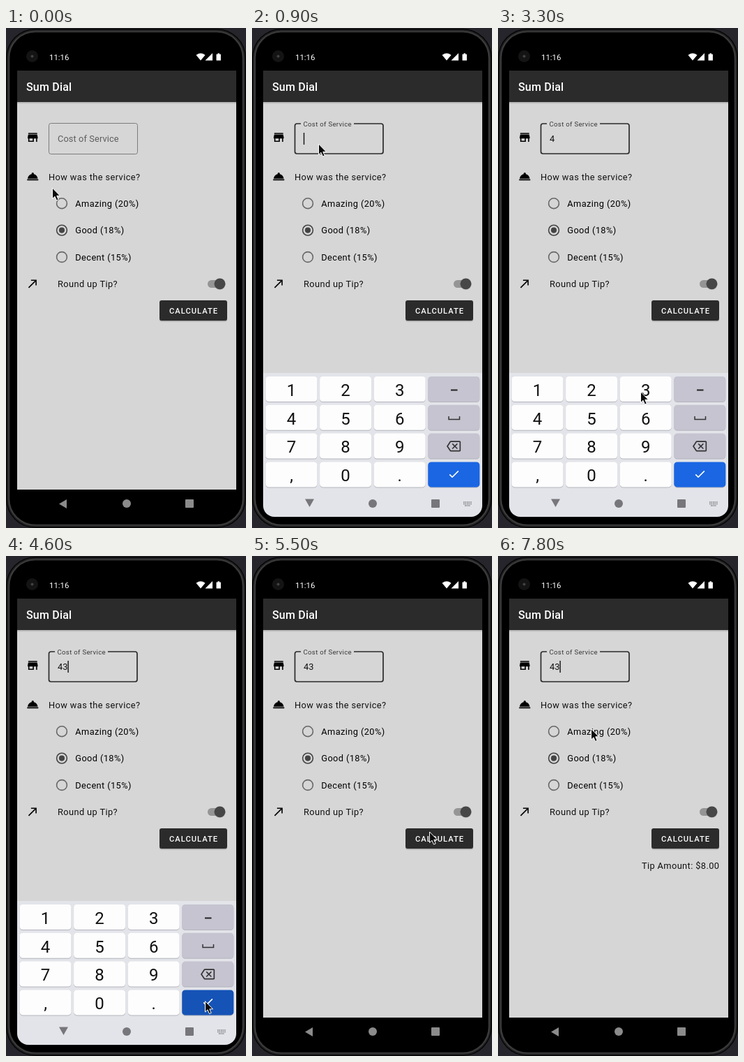
An HTML page that plays this animation: 344x716 px, repeating every 8 s.

```html
<!DOCTYPE html>
<html lang="en">
<head>
<meta charset="utf-8">
<title>Tip calculator</title>
<style>
  html, body { margin: 0; width: 100%; height: 100%; overflow: hidden; background: #25252b; }
  svg { display: block; width: 344px; height: 716px; }
  text { font-family: Roboto, sans-serif; font-size: 12.8px; letter-spacing: .4px; fill: #111; }
  .title { font-size: 16px; font-weight: 500; letter-spacing: .2px; fill: #fff; }
  .clock { font-size: 11.4px; letter-spacing: 0; fill: #fff; }
  .field { letter-spacing: .1px; }
  .button { font-size: 11.2px; font-weight: 500; letter-spacing: 1px; fill: #fff; }
  .digit { font-size: 24px; letter-spacing: 0; text-anchor: middle; fill: #111; }
</style>
</head>
<body>
<svg viewBox="0 0 344 716">
  <defs>
    <clipPath id="screen"><path d="M16 61H330V684a16 16 0 0 1-16 16H32a16 16 0 0 1-16-16Z"/></clipPath>
    <clipPath id="buttonClip"><rect x="220" y="390" width="97" height="29" rx="3"/></clipPath>
    <linearGradient id="shade" x2="0" y2="1"><stop stop-opacity=".2"/><stop offset="1" stop-opacity="0"/></linearGradient>
  </defs>

  <!-- phone -->
  <rect x="0" y="1" width="344" height="715" rx="42" fill="#040404"/>
  <rect x="3.500" y="4.500" width="337" height="708" rx="38.500" fill="#000" stroke="#242425" stroke-width="4"/>
  <rect x="4" y="5" width="336" height="707" rx="38" fill="none" stroke="#474748" stroke-width="1.200"/>
  <circle cx="37.500" cy="40.500" r="8.500" fill="#141415"/>
  <circle cx="37.500" cy="40.500" r="2" fill="#414145"/>
  <text class="clock" x="62" y="45.500">11:16</text>
  <g fill="#fff">
    <path d="M272.500 38.700Q279 33.800 285.500 38.700L279 46.500Z"/>
    <path d="M296 36V46.500H285.500Z"/>
    <path d="M301.500 37.500h2v-1.300h2.400v1.300h2v9h-6.400Z"/>
  </g>

  <!-- app -->
  <rect x="16" y="61" width="314" height="600" fill="#d6d6d6"/>
  <rect x="16" y="106" width="314" height="3" fill="url(#shade)"/>
  <rect x="16" y="61" width="314" height="45" fill="#2b2b2b"/>
  <text class="title" x="29" y="90">Sum Dial</text>
  <path transform="translate(28.700 147) scale(.8)" d="M20 4H4v2h16V4zm1 10v-2l-1-5H4l-1 5v2h1v6h10v-6h4v6h2v-6h1zm-9 4H6v-4h6v4z"/>
  <path transform="translate(28.700 203) scale(.8)" d="M2 17h20v2H2zm11.840-9.210c.1-.24.16-.51.16-.79 0-1.100-.9-2-2-2s-2 .9-2 2c0 .28.06.55.16.79C6.250 8.600 3.270 11.930 3 16h18c-.27-4.070-3.250-7.400-7.160-8.210z"/>
  <path transform="translate(28.700 356.500) scale(.8)" d="M9 5v2h6.590L4 18.590 5.410 20 17 8.410V15h2V5z"/>

  <path id="outline" fill="none"/>
  <text class="field" id="label">Cost of Service</text>
  <text class="field" id="value" x="74" y="163"></text>
  <rect id="caret" y="150" width="1.400" height="17" fill="#111"/>

  <text x="61" y="217.500">How was the service?</text>
  <g id="radios"></g>
  <text x="74" y="371">Round up Tip?</text>
  <rect x="289" y="361" width="22" height="11" rx="5.500" fill="#959595"/>
  <circle cx="306.500" cy="367" r="8.200" opacity=".12"/>
  <circle cx="306.500" cy="366.300" r="7.900" fill="#474747"/>
  <rect x="220" y="391.500" width="97" height="29" rx="3" opacity=".2"/>
  <rect x="220" y="390" width="97" height="29" rx="3" fill="#2b2b2b"/>
  <circle id="ripple" cx="255" cy="403" fill="#fff" clip-path="url(#buttonClip)"/>
  <text class="button" x="234" y="409">CALCULATE</text>
  <text id="result" x="317.400" y="447.700" text-anchor="end">Tip Amount: $8.00</text>

  <!-- navigation and keyboard -->
  <path id="backLeft" d="M76 681.500L87 675V688Z" fill="#8b8b8b"/>
  <g clip-path="url(#screen)">
    <g id="keyboard">
      <rect x="16" y="494" width="314" height="206" fill="#e3e4e9"/>
      <g id="keys"></g>
      <path d="M282 556v4.500h15.500v-4.500" fill="none" stroke="#333" stroke-width="1.500"/>
      <path d="M285 518.500h9.500" stroke="#222" stroke-width="1.800"/>
      <path transform="translate(279 588.800) scale(.84)" fill="#333" d="M22 3H7c-.69 0-1.230.35-1.590.88L0 12l5.410 8.110c.36.53.9.89 1.590.89h15c1.100 0 2-.9 2-2V5c0-1.100-.9-2-2-2zm0 16H7.070L2.400 12l4.660-7H22v14zm-11.590-2L14 13.410 17.590 17 19 15.590 15.410 12 19 8.410 17.590 7 14 10.590 10.410 7 9 8.410 12.590 12 9 15.590z"/>
      <path transform="translate(280 629.500) scale(.78)" fill="#fff" d="M9 16.170L4.830 12l-1.420 1.410L9 19 21 7l-1.410-1.410z"/>
      <path d="M76 674.500H89L82.500 686Z" fill="#77777b"/>
      <path d="M303 679h12M303 681.500h12M305 684h8" stroke="#7c7c80" stroke-width="1.500" stroke-dasharray="1.600 .9"/>
    </g>
  </g>
  <g id="home"><circle cx="173" cy="681" r="6"/><rect x="257" y="675" width="12" height="12" rx="1"/></g>

  <path id="pointer" d="M0 0V15.500L3.500 12.300 6 18 8.700 16.900 6.300 11.300H11Z" fill="#0a0a0a" stroke="#fff" stroke-width="1" stroke-linejoin="round"/>
</svg>
<script>
const $ = id => document.getElementById(id);
const set = (id, attrs) => { for (const k in attrs) $(id).setAttribute(k, attrs[k]); };
const show = (id, on) => set(id, { visibility: on ? 'visible' : 'hidden' });
const ramp = (t, a, b) => Math.min(1, Math.max(0, (t - a) / (b - a)));
const ease = p => p * p * (3 - 2 * p);
const within = (t, a, b) => t >= a && t < b;

const LOOP = 8000, STEP = 100;
const FOCUS = 600, FIRST = 2600, SECOND = 3600, HIDE = 4700, RESULT = 6200;

// pointer stops: time, x, y
const stops = [
  [0, 66.5, 229], [600, 95.5, 166], [1000, 95.5, 166],
  [2100, 68.5, 546], [2500, 68.5, 546], [3300, 204.5, 521], [3700, 204.5, 521],
  [4500, 285.5, 637.5], [4700, 285.5, 637.5],
  [5500, 254.5, 395], [5800, 254.5, 403], [6900, 254.5, 403],
  [7200, 250, 418.5], [7800, 133.5, 247.5], [LOOP, 133.5, 247.5]
];

const choices = ['Amazing (20%)', 'Good (18%)', 'Decent (15%)'];
$('radios').innerHTML = choices.map((name, i) => {
  const y = 251.2 + 38.4 * i, on = i === 1;
  return `<circle cx="80" cy="${y}" r="7.4" fill="none" stroke="${on ? '#444' : '#686868'}" stroke-width="1.6"/>` +
    (on ? `<circle cx="80" cy="${y}" r="4.1" fill="#444"/>` : '') +
    `<text x="99.300" y="${y + 4.6}" style="fill:#000">${name}</text>`;
}).join('');

$('keys').innerHTML = [...'123-456_789<,0.>'].map((key, i) => {
  const col = i % 4, x = 19.5 + 77.6 * col, y = 499 + 40.8 * (i >> 2);
  const fill = key === '>' ? '#1a66e3' : col === 3 ? '#c5c4d0' : '#fdfdfd';
  return `<rect x="${x}" y="${y + 1}" width="74" height="36" rx="4.500" fill="#b4b5bd"/>` +
    `<rect id="key${i}" x="${x}" y="${y}" width="74" height="36" rx="4.500" fill="${fill}"/>` +
    (col < 3 ? `<text class="digit" x="${x + 37}" y="${y + 27.8}">${key}</text>` : '');
}).join('');

function pointerAt(t) {
  const i = stops.findIndex(s => s[0] > t);
  const [t0, x0, y0] = stops[i - 1], [t1, x1, y1] = stops[i];
  const p = ease(ramp(t, t0, t1));
  return [x0 + (x1 - x0) * p, y0 + (y1 - y0) * p];
}

function drawField(t) {
  const focused = t >= FOCUS, p = ramp(t, FOCUS - 100, FOCUS + 100);
  set('outline', {
    d: focused
      ? 'M70 137H64.500a3 3 0 0 0-3 3V177a3 3 0 0 0 3 3H185a3 3 0 0 0 3-3V140a3 3 0 0 0-3-3H146'
      : 'M64.500 136.500H185.500a3 3 0 0 1 3 3V177.500a3 3 0 0 1-3 3H64.500a3 3 0 0 1-3-3V139.500a3 3 0 0 1 3-3Z',
    stroke: focused ? '#2b2b2b' : '#7c7c7c',
    'stroke-width': focused ? 1.7 : 1
  });
  set('label', {
    x: 74 - .5 * p, y: 163 - 22 * p,
    style: `font-size:${12.8 - 3.2 * p}px;letter-spacing:${.1 + .22 * p}px;fill:${focused ? '#3a3a3a' : '#5e5e5e'}`
  });
  const typed = '43'.slice(0, (t >= FIRST) + (t >= SECOND));
  $('value').textContent = typed;
  // the blink restarts whenever the text changes
  const since = t - [FOCUS, FIRST, SECOND][typed.length];
  set('caret', { x: 73.8 + 7.3 * typed.length });
  show('caret', since >= 0 && since % 1000 < 500);
}

function draw(now) {
  const t = Math.floor(now % LOOP / STEP) * STEP;
  drawField(t);

  const open = ease(ramp(t, FOCUS, FOCUS + 300)) * (1 - ease(ramp(t, HIDE, HIDE + 300)));
  set('keyboard', { transform: `translate(0 ${206 * (1 - open)})` });
  show('keyboard', open > 0);
  show('backLeft', open < .2);
  set('home', { fill: open > .2 ? '#77777b' : '#8b8b8b' });

  set('key4', { fill: within(t, 2200, 2600) ? '#dedede' : '#fdfdfd' });
  set('key2', { fill: within(t, 3400, 3800) ? '#dedede' : '#fdfdfd' });
  set('key15', { fill: within(t, 4500, 4800) ? '#1553b6' : '#1a66e3' });

  // the press spreads, holds, then lets go in two steps
  set('ripple', {
    r: 80 * ramp(t, 6000, 6300),
    opacity: within(t, 6100, 6600) ? .2 : within(t, 6600, 6800) ? .1 : 0
  });
  show('result', t >= RESULT);
  set('pointer', { transform: `translate(${pointerAt(t)})` });
}

const start = performance.now();
function tick() {
  draw(performance.now() - start);
  requestAnimationFrame(tick);
}
tick();
</script>
</body>
</html>
```
